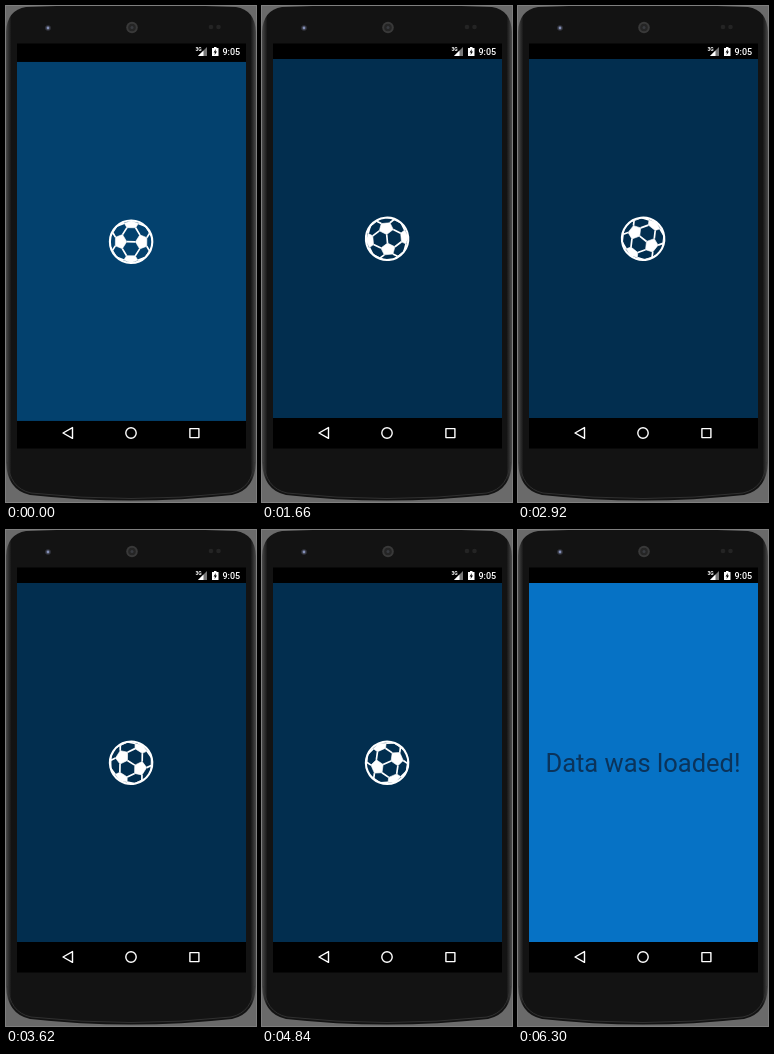
An HTML page that plays this animation: 250x496 px, repeating every 6320 ms.

```html
<!DOCTYPE html>
<html lang="en">
<head>
<meta charset="utf-8">
<title>Loading ball</title>
<style>
  html, body { margin: 0; width: 100%; height: 100%; overflow: hidden; background: #6a6a6a; }
  svg { display: block; width: 250px; height: 496px; }
  text { font-family: Roboto, "Noto Sans", sans-serif; }
</style>
</head>
<body>
<svg viewBox="0 0 250 496">
  <defs>
    <linearGradient id="side">
      <stop offset="0" stop-color="#4a4a4a"/>
      <stop offset=".012" stop-color="#2b2b2b"/>
      <stop offset=".022" stop-color="#131313"/>
      <stop offset=".978" stop-color="#131313"/>
      <stop offset=".988" stop-color="#2b2b2b"/>
      <stop offset="1" stop-color="#4a4a4a"/>
    </linearGradient>
    <clipPath id="ballClip"><circle r="21.5"/></clipPath>
  </defs>

  <path d="M0 26Q1 4 20 1Q125 -3 230 1Q249 4 250 26V456Q249 484 226 489Q125 500 24 489Q1 484 0 456Z" fill="url(#side)"/>
  <path d="M2 456Q3 482 25 487Q125 498 225 487Q247 482 248 456" fill="none" stroke="#303030"/>

  <circle cx="42" cy="22" r="2.8" fill="#34363f"/>
  <circle cx="42" cy="22" r="1.4" fill="#8590b8"/>
  <circle cx="126" cy="21.5" r="5.8" fill="#393939"/>
  <circle cx="126" cy="21.5" r="3.8" fill="#252525"/>
  <circle cx="126" cy="21.5" r="1.5" fill="#393b40"/>
  <g fill="#242424"><circle cx="205" cy="21" r="2.3"/><circle cx="212.5" cy="21" r="2.3"/></g>

  <rect x="11" y="37.5" width="229" height="405" fill="#000"/>
  <g fill="#fff">
    <text x="189.5" y="45" font-size="5" font-weight="700">3G</text>
    <path d="M192 50L201 41V50Z" fill="#777"/>
    <path d="M192 50L197.5 44.5V50Z"/>
    <path d="M206 42H208V41H210.5V42H212.5V50H206Z"/>
    <path d="M209.8 43L207.6 46.5H209L208.6 49L211 45.4H209.5Z" fill="#000"/>
    <text x="216.5" y="49" font-size="9" font-weight="500">9:05</text>
  </g>
  <g fill="none" stroke="#fff" stroke-width="1.4" stroke-linejoin="round">
    <path d="M57 427L66.5 421.6V432.4Z"/>
    <circle cx="125" cy="427" r="5.2"/>
    <rect x="183.9" y="422.6" width="9" height="9"/>
  </g>

  <g id="screen">
    <rect id="panel" x="11" y="53" width="229" height="359"/>
    <g id="ball">
      <g clip-path="url(#ballClip)">
        <path id="seams" fill="none" stroke="#fff" stroke-width="1.7"/>
        <path id="patches" fill="#fff" stroke="#fff" stroke-width=".6"/>
      </g>
      <circle r="21.2" fill="none" stroke="#fff" stroke-width="2.1"/>
    </g>
    <text id="message" x="125" y="242" font-size="25.5" text-anchor="middle" fill="#0b335a">Data was loaded!</text>
  </g>
</svg>
<script>
const LOOP = 6320, DONE = 6300, RADIUS = 21.5;
const $ = id => document.getElementById(id);

// The ball is a truncated icosahedron seen along the middle of an edge.
function buildBall() {
  const PHI = (1 + Math.sqrt(5)) / 2;
  const corners = [];
  for (const a of [-1, 1]) for (const b of [-PHI, PHI])
    corners.push([a, 0, b], [0, b, a], [b, a, 0]);

  const distance = (p, q) => Math.hypot(...p.map((v, i) => v - q[i]));
  const third = (p, q) => {
    const point = p.map((v, i) => v + (q[i] - v) / 3);
    const size = Math.hypot(...point);
    return point.map(v => v / size);
  };
  const flat = p => (p[0] * RADIUS).toFixed(2) + ' ' + (p[1] * RADIUS).toFixed(2);

  let seams = '', patches = '';
  for (const c of corners) {
    if (c[2] < -0.1) continue;
    const near = corners.filter(q => Math.abs(distance(c, q) - 2) < 0.01);
    for (const q of near) {
      const from = third(c, q), to = third(q, c);
      if (from[2] + to[2] > 0) seams += `M${flat(from)}L${flat(to)}`;
    }
    // Walk round the five neighbours so the patch outline does not cross itself.
    const ring = [near[0]];
    while (ring.length < 5) {
      const last = ring[ring.length - 1];
      ring.push(near.find(q => !ring.includes(q) && Math.abs(distance(last, q) - 2) < 0.01));
    }
    patches += 'M' + ring.map(q => flat(third(c, q))).join('L') + 'Z';
  }
  $('seams').setAttribute('d', seams);
  $('patches').setAttribute('d', patches);
}

const mix = (from, to, k) =>
  `rgb(${from.map((v, i) => Math.round(v + (to[i] - v) * k))})`;

function draw(t) {
  const done = t >= DONE;
  const entering = Math.max(0, 1 - t / 160) ** 3;
  const angle = 31 * (1 - entering) + 0.249 * t;

  $('screen').setAttribute('transform', `translate(0 ${done ? 0 : 3 * entering})`);
  $('panel').setAttribute('fill', done ? '#0672c5' : mix([2, 46, 79], [3, 65, 111], entering));
  $('ball').setAttribute('transform', `translate(125.1 232.8) rotate(${angle})`);
  $('ball').style.display = done ? 'none' : '';
  $('message').style.display = done ? '' : 'none';
}

buildBall();
const start = performance.now();
function tick() {
  draw((performance.now() - start) % LOOP);
  requestAnimationFrame(tick);
}
tick();
</script>
</body>
</html>
```
